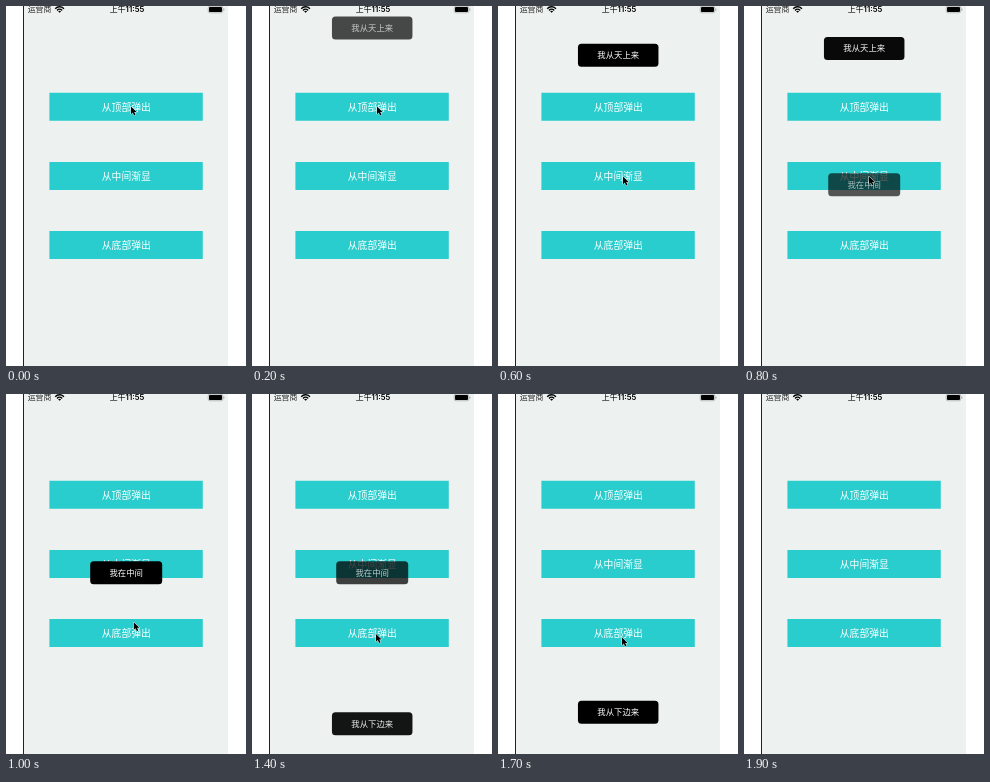
An HTML page with a canvas that plays this animation: 240x360 px, repeating every 2 s.

```html
<!DOCTYPE html>
<html lang="zh">
<head>
<meta charset="utf-8">
<style>
  html, body { margin: 0; width: 100%; height: 100%; overflow: hidden; background: #fff; }
  canvas { display: block; width: 240px; height: 360px; }
</style>
</head>
<body>
<canvas id="stage"></canvas>
<script>
const LOOP = 2000, STEP = 100, FADE = 300, GLIDE = 265;
const SLIDE = 61;
const CJK = '"Noto Sans CJK SC", "Noto Sans CJK", sans-serif';
const canvas = document.getElementById('stage');
const ctx = canvas.getContext('2d');
const ratio = window.devicePixelRatio || 1;
canvas.width = 240 * ratio;
canvas.height = 360 * ratio;

const progress = (t, start, span) => Math.min(1, Math.max(0, (t - start) / span));
const smooth = k => k * k * (3 - 2 * k);

function box(x, y, w, h, color, r = 0) {
  ctx.fillStyle = color;
  ctx.beginPath();
  ctx.roundRect(x, y, w, h, r);
  ctx.fill();
}

function label(text, x, y, font, color, align = 'center') {
  ctx.font = font;
  ctx.fillStyle = color;
  ctx.textAlign = align;
  ctx.fillText(text, x, y);
}

function button(text, y) {
  box(43.4, y, 153.4, 28, '#2acdcd');
  label(text, 120.3, y + 17.8, '300 9.8px ' + CJK, '#fff');
}

function toast(text, width, y, alpha) {
  if (alpha <= 0) return;
  ctx.globalAlpha = alpha;
  box(120.2 - width / 2, y, width, 23, '#000', 3.5);
  label(text, 120.2, y + 14.4, '300 8.4px ' + CJK, '#fff');
  ctx.globalAlpha = 1;
}

// Slides in from an edge (dir -1 is above, 1 below) and back out.
function slideToast(text, y, dir, enter, leave, t) {
  const away = Math.max(1 - progress(t, enter, FADE), progress(t, leave, FADE));
  toast(text, 80.5, y + dir * SLIDE * away ** 2, 1 - away ** 3);
}

function fadeToast(text, y, enter, leave, t) {
  const alpha = smooth(progress(t, enter, FADE)) - smooth(progress(t, leave, FADE));
  toast(text, 72, y, alpha);
}

function wifi(x, y) {
  const from = -Math.PI * .76, to = -Math.PI * .24;
  ctx.strokeStyle = ctx.fillStyle = '#000';
  ctx.lineWidth = 1.4;
  for (const r of [3.5, 6]) {
    ctx.beginPath();
    ctx.arc(x, y, r, from, to);
    ctx.stroke();
  }
  ctx.beginPath();
  ctx.moveTo(x, y);
  ctx.arc(x, y, 2, from, to);
  ctx.fill();
}

function statusBar() {
  label('运营商', 21.7, 6.1, '7.9px ' + CJK, '#222', 'left');
  wifi(53.6, 6.8);
  label('上午', 103.8, 6.2, '500 7.9px ' + CJK, '#000', 'left');
  label('11:55', 119.6, 6.2, '600 7.8px Inter, sans-serif', '#000', 'left');
  ctx.strokeStyle = '#929594';
  ctx.lineWidth = .6;
  ctx.beginPath();
  ctx.roundRect(202.2, .2, 14.6, 6.6, 1.8);
  ctx.stroke();
  box(203, 1, 13, 5, '#000', 1);
  box(217.4, 2.4, .9, 2.2, '#929594', .4);
}

function pointer(t) {
  if (t >= 1900) return;
  let x = 125, y = 100.4;
  const glide = (start, dx, dy, bow) => {
    const k = smooth(progress(t, start, GLIDE));
    x += dx * k + bow * Math.sin(Math.PI * k);
    y += dy * k;
  };
  glide(200, 0, 70, 13);
  glide(800, -1, 68, 8);
  glide(1300, 0, 5, 0);

  ctx.save();
  ctx.translate(x, y);
  ctx.scale(.9, .9);
  ctx.beginPath();
  ctx.lineTo(0, 0);
  ctx.lineTo(0, 8.6);
  ctx.lineTo(2, 6.8);
  ctx.lineTo(3.4, 10);
  ctx.lineTo(5, 9.3);
  ctx.lineTo(3.6, 6.2);
  ctx.lineTo(6.2, 6.2);
  ctx.closePath();
  ctx.lineJoin = 'round';
  ctx.lineWidth = 1;
  ctx.strokeStyle = '#fff';
  ctx.stroke();
  ctx.fillStyle = '#000';
  ctx.fill();
  ctx.restore();
}

function draw(t) {
  ctx.setTransform(ratio, 0, 0, ratio, 0, 0);
  box(0, 0, 240, 360, '#fff');
  box(17, 0, 205, 360, '#edf2f1');
  box(17, 0, 1, 360, '#222');
  statusBar();
  ['从顶部弹出', '从中间渐显', '从底部弹出'].forEach((text, i) => button(text, 86.8 + 69.1 * i));
  slideToast('我从天上来', 37.7, -1, 100, 700, t);
  fadeToast('我在中间', 167.2, 620, 1300, t);
  if (t < 1900) slideToast('我从下边来', 306.7, 1, 1230, 1700, t);
  pointer(t);
}

const start = performance.now();
function frame() {
  const t = (performance.now() - start) % LOOP;
  draw(Math.floor(t / STEP) * STEP);
  requestAnimationFrame(frame);
}
frame();
</script>
</body>
</html>
```
